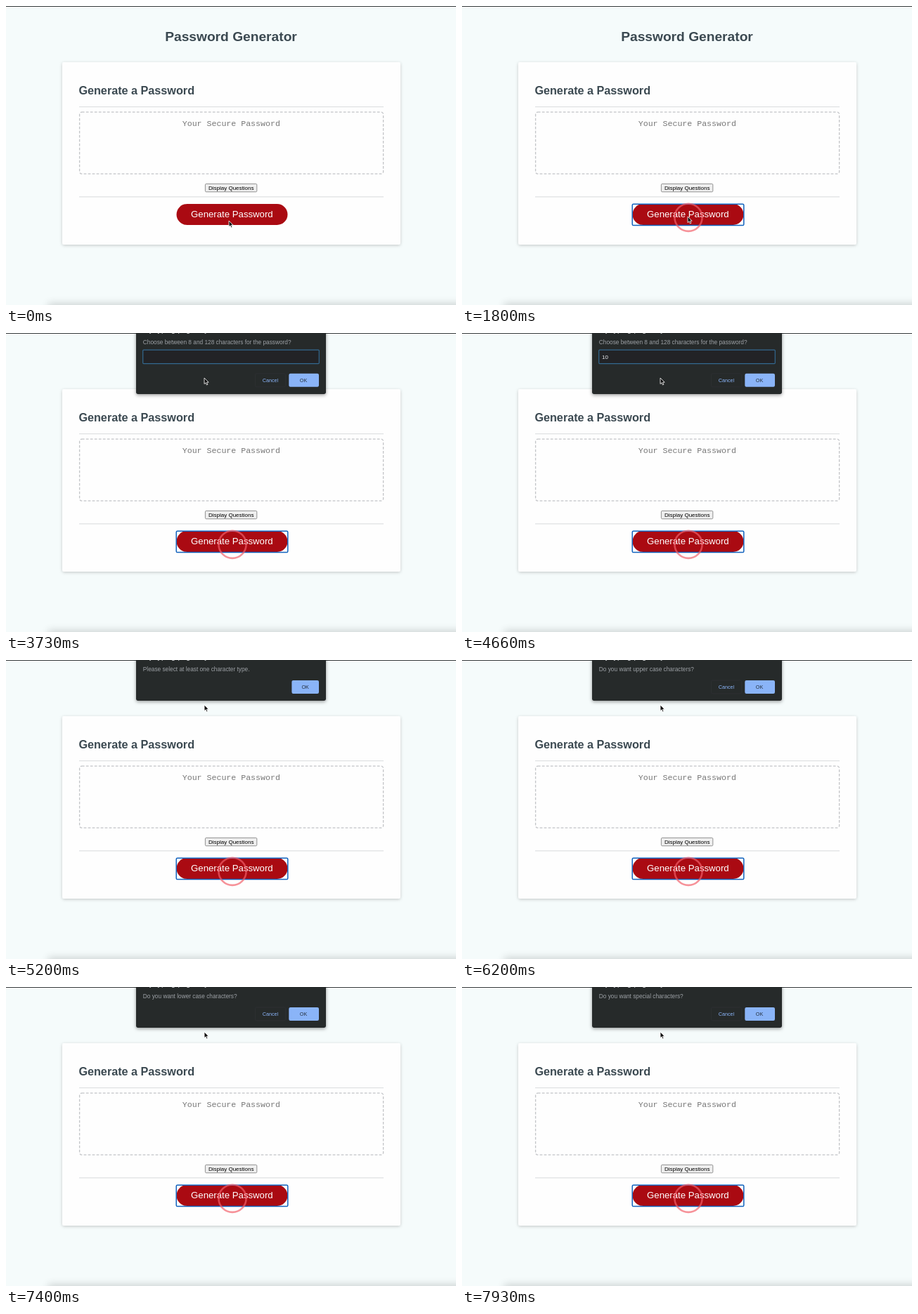
Animation of 640x426 px, one loop 8000 ms. Source, as an HTML page:

```html
<!DOCTYPE html>
<html lang="en">
<head>
<meta charset="utf-8">
<title>Password Generator</title>
<style>
  html, body { margin: 0; height: 100%; overflow: hidden; background: #f5fbfb; }
  svg { display: block; width: 100vw; height: 100vh; }
  text { font-family: "Liberation Sans", Arial, sans-serif; }
  .heading { font-weight: bold; fill: #3b4951; }
  .middle { text-anchor: middle; }
  .mono { font: 11.6px "Liberation Mono", monospace; fill: #777; }
  .rule { stroke: #dfe1e3; stroke-width: 1.2; }
  .small { font-size: 7.2px; }
  .message { font-size: 8.3px; fill: #9da1a6; }
</style>
</head>
<body>
<svg viewBox="0 0 640 426">
  <defs>
    <filter id="cardShadow" x="-10%" y="-10%" width="120%" height="120%">
      <feDropShadow dx="0" dy="1.2" stdDeviation="2" flood-color="#000" flood-opacity=".2"/>
    </filter>
    <filter id="dialogShadow" x="-10%" y="-30%" width="120%" height="170%">
      <feDropShadow dx="0" dy="1.5" stdDeviation="2.5" flood-color="#000" flood-opacity=".4"/>
    </filter>
    <filter id="blur" x="-10%" y="-100%" width="120%" height="300%">
      <feGaussianBlur stdDeviation="6"/>
    </filter>
  </defs>

  <rect width="640" height="426" fill="#f5fbfb"/>
  <rect x="60" y="424" width="620" height="30" fill="#000" opacity=".17" filter="url(#blur)"/>
  <rect width="640" height="1" fill="#35383a"/>
  <text class="heading middle" x="320" y="50" font-size="19.2">Password Generator</text>

  <rect x="80" y="80" width="481" height="260" rx="2.4" fill="#fefefe" filter="url(#cardShadow)"/>
  <text class="heading" x="103.4" y="126" font-size="16.2">Generate a Password</text>
  <path class="rule" d="M104 143.7H537M104 271.8H537"/>
  <rect x="104.6" y="151.2" width="432" height="88" rx="3.2" fill="none"
        stroke="#c2c4c7" stroke-width="1.3" stroke-dasharray="3.8 2.2"/>
  <text class="mono middle" x="320.3" y="171">Your Secure Password</text>
  <rect x="283.4" y="253.4" width="73.4" height="11.4" rx="1.4" fill="#efefef" stroke="#777" stroke-width=".8"/>
  <text class="middle" x="320.2" y="262" font-size="8">Display Questions</text>

  <rect x="242.5" y="282" width="158" height="30" rx="15" fill="#aa0a12"/>
  <text class="middle" x="321.4" y="301.4" font-size="13.2" fill="#fff">Generate Password</text>
  <g id="pressed" fill="none">
    <rect x="242.2" y="282.2" width="158.6" height="30.4" rx="1.6" stroke="#1162bd" stroke-width="1.5"/>
    <circle cx="322" cy="301.3" r="19.6" stroke="#f4616b" stroke-opacity=".68" stroke-width="2.6"/>
  </g>

  <g id="dialog">
    <rect id="panel" x="185" y="-20" width="270" rx="2.4" fill="#28292c" filter="url(#dialogShadow)"/>
    <text x="195" y="-1.5" font-size="10.6" fill="#e8eaed">my-typing-page says</text>
    <text id="message" class="message" x="194.8" y="16.4"></text>
    <g id="field">
      <rect x="194.7" y="24.2" width="250.6" height="19.4" rx="1" fill="#222326" stroke="#33688f" stroke-width="1.2"/>
      <text id="typed" x="199" y="37" font-size="8" fill="#e8eaed"></text>
    </g>
    <g id="buttons">
      <g id="cancel">
        <rect x="354.5" y="-9.5" width="43" height="19" rx="2" fill="none" stroke="#303135" stroke-width=".7"/>
        <text class="small middle" x="376" y="2.5" fill="#8ab4f8">Cancel</text>
      </g>
      <rect id="okBox" y="-9.5" height="19" rx="2.2" fill="#8ab4f8"/>
      <text id="okText" class="small middle" y="2.5" fill="#26303f">OK</text>
    </g>
  </g>

  <path id="cursor" d="M0 0V8.6L2 6.8L3.4 10L4.9 9.3L3.5 6.2H6.2Z"
        fill="#111" stroke="#fff" stroke-width=".8" stroke-linejoin="round"/>
</svg>
<script>
const LOOP = 8000, CLICK = 1400, TYPE = 4050;
const get = id => document.getElementById(id);
const show = (id, on) => get(id).setAttribute("visibility", on ? "inherit" : "hidden");
const set = (id, attrs) => {
  for (const name in attrs) get(id).setAttribute(name, attrs[name]);
};

const dialogs = [
  { at: 2080, kind: "prompt", text: "Choose between 8 and 128 characters for the password?" },
  { at: 4720, kind: "alert", text: "Please select at least one character type." },
  { at: 5750, kind: "confirm", text: "Do you want upper case characters?" },
  { at: 6640, kind: "confirm", text: "Do you want lower case characters?" },
  { at: 7500, kind: "confirm", text: "Do you want special characters?" }
];

// Pointer moves: start, end, from, to
const moves = [
  [200, 800, [317, 306], [321, 300]],
  [2350, 3100, [321, 300], [282, 64]]
];

function pointerAt(t) {
  let place = moves[0][2];
  for (const [start, end, from, to] of moves) {
    if (t < start) break;
    const p = Math.min(1, (t - start) / (end - start));
    const ease = p * p * (3 - 2 * p);
    place = from.map((v, i) => v + (to[i] - v) * ease);
  }
  return place;
}

function drawDialog(t) {
  const current = dialogs.filter(d => d.at <= t).pop();
  set("dialog", { visibility: current ? "visible" : "hidden" });
  if (!current) return;
  const prompt = current.kind === "prompt", alert = current.kind === "alert";
  get("message").textContent = current.text;
  get("typed").textContent = t < TYPE ? "" : t < TYPE + 180 ? "1" : "10";
  set("panel", { height: prompt ? 107 : 78 });
  set("buttons", { transform: `translate(0 ${prompt ? 67.3 : 38.4})` });
  set("okBox", { x: alert ? 406.4 : 402.3, width: alert ? 38.6 : 42.7 });
  set("okText", { x: alert ? 425.6 : 423 });
  show("field", prompt);
  show("cancel", !alert);
}

function draw(now) {
  const t = now % LOOP;
  show("pressed", t >= CLICK);
  drawDialog(t);
  set("cursor", { transform: `translate(${pointerAt(t)})` });
}

const began = performance.now();
function tick() {
  draw(performance.now() - began);
  requestAnimationFrame(tick);
}
tick();
</script>
</body>
</html>
```
